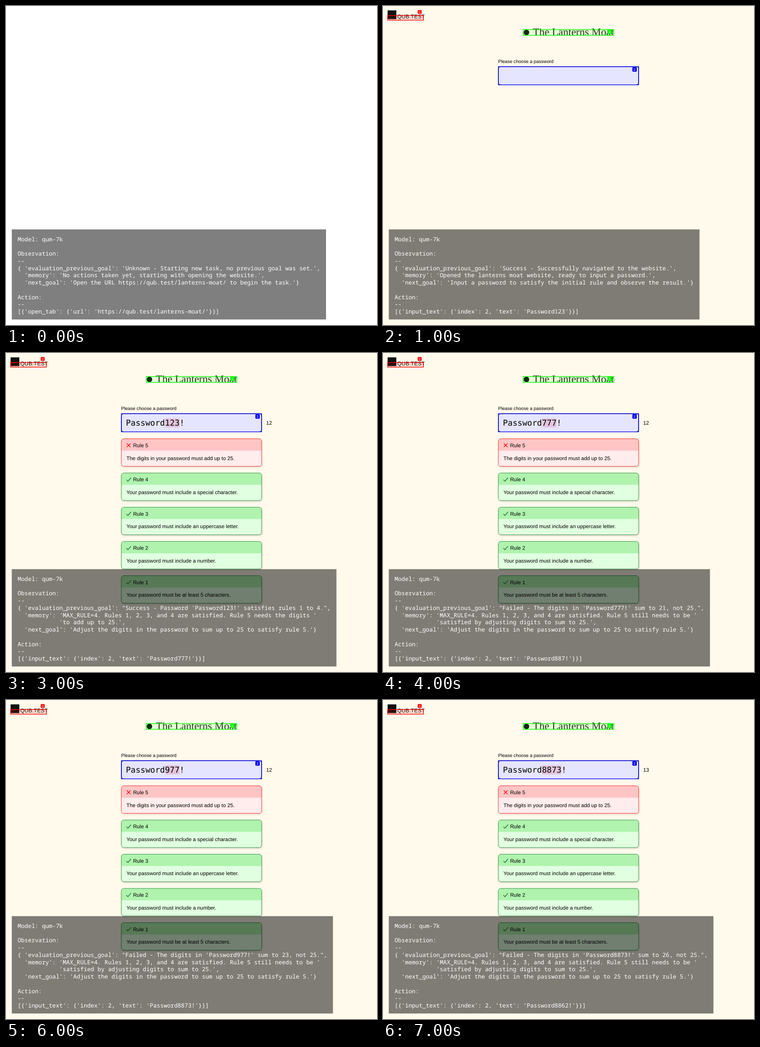
Recreate the animation shown at these times as an HTML page with a canvas. Size 807 by 694 pixels, loop 8 s.

```html
<!DOCTYPE html>
<html lang="en">
<head>
<meta charset="utf-8">
<title>Agent run</title>
<style>
  html, body { margin: 0; width: 100%; height: 100%; overflow: hidden; background: #fff; }
  canvas { display: block; }
</style>
</head>
<body>
<canvas id="stage" width="807" height="694"></canvas>
<script>
const ctx = document.getElementById('stage').getContext('2d');
const STEP_MS = 1000;
const SANS = '"Liberation Sans", Arial, sans-serif';
const SERIF = '"Liberation Serif", "Times New Roman", serif';
const MONO = '"DejaVu Sans Mono", monospace';
const LOG_FONT = '"Roboto Mono", "Noto Sans Mono", monospace';
const SITE = 'https://qub.test/lanterns-moat/';

const RULES = [
  'Your password must be at least 5 characters.',
  'Your password must include a number.',
  'Your password must include an uppercase letter.',
  'Your password must include a special character.',
  'The digits in your password must add up to 25.'
];

function report(evaluation, memory, goal, action) {
  const wrap = (key, parts) => parts.map((part, i) => (i ? ' '.repeat(key.length) : key) + part);
  return [
    'Model: qum-7k', '', 'Observation:', '--',
    ...wrap("{ 'evaluation_previous_goal': ", evaluation),
    ...wrap("  'memory': ", memory),
    `  'next_goal': '${goal}'}`,
    '', 'Action:', '--', action
  ];
}

const typeIn = password => `[{'input_text': {'index': 2, 'text': '${password}'}}]`;

function failedSum(password, sum, next) {
  return {
    password, rules: 5, marked: true,
    log: report(
      [`"Failed - The digits in '${password}' sum to ${sum}, not 25.",`],
      ["'MAX_RULE=4. Rules 1, 2, 3, and 4 are satisfied. Rule 5 still needs to be '",
       "'satisfied by adjusting digits to sum to 25.',"],
      'Adjust the digits in the password to sum up to 25 to satisfy rule 5.',
      typeIn(next))
  };
}

const steps = [
  {
    blank: true,
    log: report(
      ["'Unknown - Starting new task, no previous goal was set.',"],
      ["'No actions taken yet, starting with opening the website.',"],
      `Open the URL ${SITE} to begin the task.`,
      `[{'open_tab': {'url': '${SITE}'}}]`)
  },
  {
    password: '', rules: 0,
    log: report(
      ["'Success - Successfully navigated to the website.',"],
      ["'Opened the lanterns moat website, ready to input a password.',"],
      'Input a password to satisfy the initial rule and observe the result.',
      typeIn('Password123'))
  },
  {
    password: 'Password123', rules: 4,
    log: report(
      ["\"Success - Password 'Password123' satisfies rules 1, 2, \"", "'and 3.',"],
      ["'MAX_RULE=3. Rules 1, 2, and 3 are satisfied. Rule 4 needs a special '", "'character.',"],
      'Modify the password to include a special character to satisfy rule 4.',
      typeIn('Password123!'))
  },
  {
    password: 'Password123!', rules: 5, marked: true,
    log: report(
      ["\"Success - Password 'Password123!' satisfies rules 1 to 4.\","],
      ["'MAX_RULE=4. Rules 1, 2, 3, and 4 are satisfied. Rule 5 needs the digits '",
       "'to add up to 25.',"],
      'Adjust the digits in the password to sum up to 25 to satisfy rule 5.',
      typeIn('Password777!'))
  },
  failedSum('Password777!', 21, 'Password887!'),
  failedSum('Password887!', 23, 'Password977!'),
  failedSum('Password977!', 23, 'Password8873!'),
  failedSum('Password8873!', 26, 'Password8862!')
];

function text(str, x, y, size, family = SANS, color = '#000', weight = '') {
  ctx.font = `${weight} ${size}px ${family}`;
  ctx.fillStyle = color;
  ctx.fillText(str, x, y);
}

function rect(x, y, w, h, color) {
  ctx.fillStyle = color;
  ctx.fillRect(x, y, w, h);
}

function rounded(x, y, w, h, r) {
  ctx.beginPath();
  ctx.roundRect(x, y, w, h, r);
}

function line(points, color, width) {
  ctx.beginPath();
  points.forEach(([x, y]) => ctx.lineTo(x, y));
  ctx.strokeStyle = color;
  ctx.lineWidth = width;
  ctx.stroke();
}

function outline(x, y, w, h, color, tint) {
  rect(x, y, w, h, tint);
  ctx.strokeStyle = color;
  ctx.lineWidth = 1.4;
  ctx.strokeRect(x, y, w, h);
}

function badge(label, x, y, w, h, color) {
  rounded(x, y, w, h, 2);
  ctx.fillStyle = color;
  ctx.fill();
  ctx.textAlign = 'center';
  text(label, x + w / 2, y + h / 2 + 2.7, 7.5, SANS, '#fff');
  ctx.textAlign = 'left';
}

function header() {
  rect(10, 9.5, 19, 19, '#111');
  text('QUB.TEST', 31, 27, 12, SANS, '#111');
  outline(10, 20.7, 78, 10, '#f00', 'rgba(255,0,0,.1)');
  badge('0', 75.5, 8.8, 8.6, 8.4, '#f00');

  ctx.save();
  ctx.beginPath();
  ctx.rect(304, 49, 200, 15);
  ctx.clip();
  ctx.beginPath();
  ctx.arc(312, 57.5, 6, 0, Math.PI * 2);
  ctx.fillStyle = '#111';
  ctx.fill();
  text('The Lanterns Moat', 326, 64.3, 23, SERIF, '#222');
  ctx.restore();
  outline(305, 51.2, 197, 12.6, '#0f0', 'rgba(0,255,0,.1)');
  badge('1', 488.3, 51, 9.6, 10, '#0f0');
}

function field(password, marked) {
  const size = 17.65, advance = size * 0.602, left = 260.7;
  text('Please choose a password', 250.5, 124.4, 10.09);
  rounded(251, 132, 305, 39.5, 5);
  ctx.fillStyle = '#fff';
  ctx.fill();
  ctx.strokeStyle = '#222';
  ctx.lineWidth = 1.2;
  ctx.stroke();
  outline(251, 132, 305, 39.5, '#00f', 'rgba(0,0,255,.1)');
  if (marked) {
    const digits = password.match(/\d+/)[0].length;
    rect(left + 8 * advance, 142, digits * advance, 20, '#e4c4dc');
  }
  text(password, left, 158.4, size, MONO);
  badge('2', 542.4, 133, 9.6, 10, '#00f');
  if (password) text(String(password.length), 566, 156, 11.35);
}

function card(number, y, failed) {
  const x = 250.9, w = 305.2, h = 60;
  ctx.save();
  ctx.shadowColor = 'rgba(0,0,0,.16)';
  ctx.shadowBlur = 4;
  ctx.shadowOffsetX = 1;
  ctx.shadowOffsetY = 2;
  rounded(x, y, w, h, 5.5);
  ctx.fillStyle = failed ? '#ffecec' : '#e1ffe1';
  ctx.fill();
  ctx.restore();

  rounded(x, y, w, 25.8, [5.5, 5.5, 0, 0]);
  ctx.fillStyle = failed ? '#ffc5c5' : '#aff3ae';
  ctx.fill();
  rounded(x, y, w, h, 5.5);
  ctx.strokeStyle = failed ? '#f22' : '#22873a';
  ctx.lineWidth = 0.9;
  ctx.stroke();

  if (failed) {
    line([[262.7, y + 10.2], [270.7, y + 18.2]], '#f00', 1.3);
    line([[270.7, y + 10.2], [262.7, y + 18.2]], '#f00', 1.3);
  } else {
    line([[261.8, y + 14.6], [265.2, y + 18], [272, y + 10.2]], '#176b28', 1.3);
  }
  text('Rule ' + number, 276.4, y + 18.1, 11.35);
  text(RULES[number - 1], 262, y + 45.9, 11.35);
}

function logPanel(lines) {
  const size = 12.61, pitch = 15.77, pad = 12.61;
  const longest = Math.max(...lines.map(l => l.length));
  const height = lines.length * pitch + 22.5;
  rect(12.6, 682 - height, longest * size * 0.6 + 2 * pad, height, 'rgba(0,0,0,.5)');
  lines.forEach((l, i) =>
    text(l, 25.2, 669.2 - (lines.length - 1 - i) * pitch, size, LOG_FONT, '#fff'));
}

function draw(step) {
  rect(0, 0, 807, 694, step.blank ? '#fff' : '#fffaeb');
  if (!step.blank) {
    header();
    field(step.password, step.marked);
    for (let i = 0; i < step.rules; i++) card(step.rules - i, 186.6 + i * 74.45, i === 0);
  }
  logPanel(step.log);
}

ctx.textRendering = 'geometricPrecision';
const start = performance.now();

function tick() {
  const elapsed = performance.now() - start;
  draw(steps[Math.floor(elapsed / STEP_MS) % steps.length]);
  requestAnimationFrame(tick);
}
tick();
</script>
</body>
</html>
```
